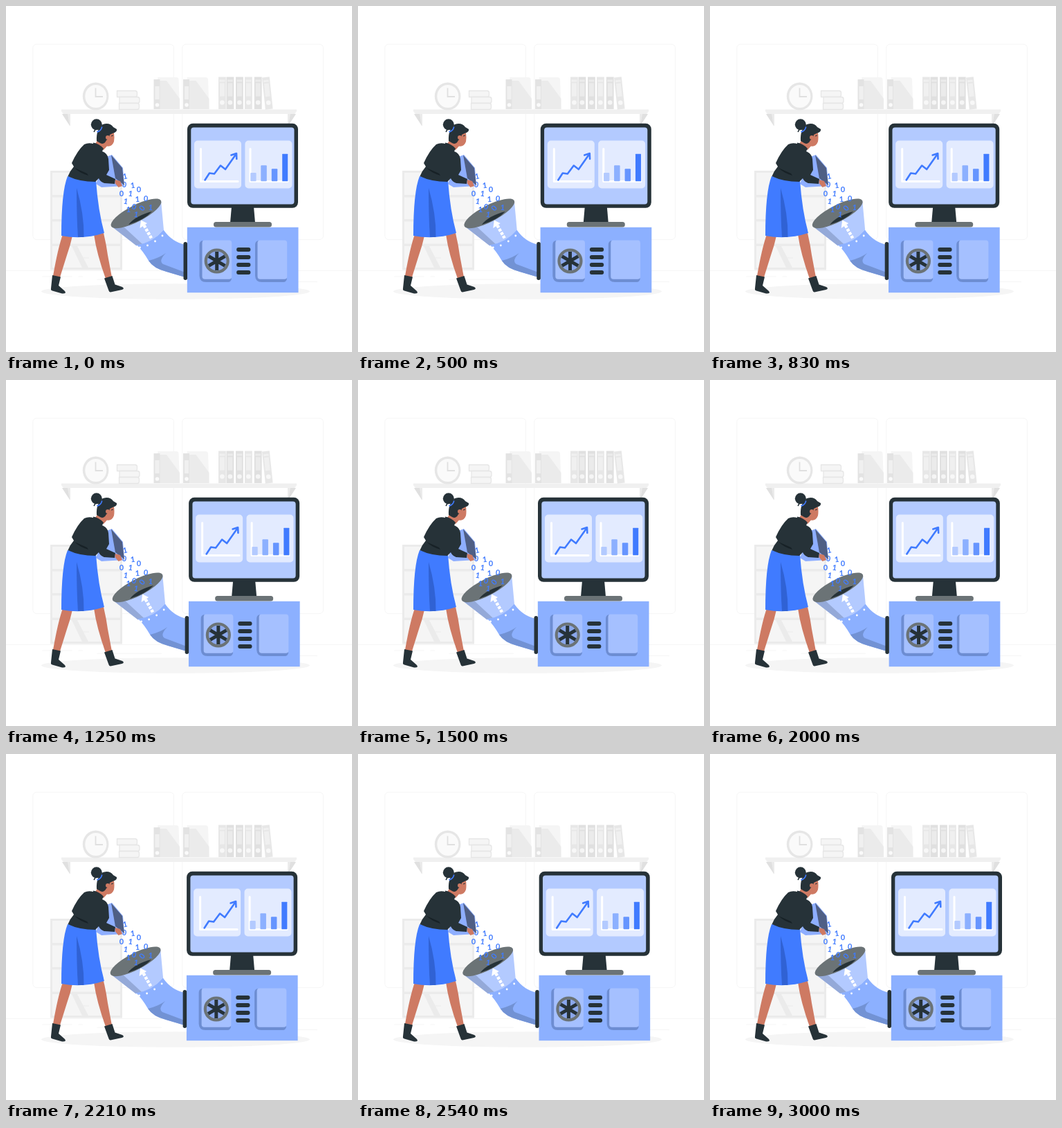
These frames come from a looping animation (500 px wide and 500 px high, 3040 ms). An HTML page:

```html
<!DOCTYPE html>
<html lang="en">
<head>
<meta charset="utf-8">
<style>
html, body { margin: 0; width: 100%; height: 100%; overflow: hidden; background: #fff; }
svg { display: block; width: 100vw; height: 100vh; }
#digits { font: 700 11px Lato, sans-serif; fill: #407bff; text-anchor: middle; }
</style>
</head>
<body>
<svg viewBox="0 0 500 500">
  <defs>
    <g id="folder">
      <path d="M219 103H246Q249 103 249.500 106L251 149H222Z" fill="#f5f5f5"/>
      <path d="M221 108H232L251 134V149H221Z" fill="#ebebeb"/>
      <path d="M213.500 106H222.500V149H213.500Z" fill="#e3e3e3"/>
      <path d="M215.500 116H221.500V135H215.500Z" fill="#f0f0f0"/>
      <circle cx="218.500" cy="143" r="2.800" fill="#fafafa"/>
    </g>
    <g id="binder">
      <path d="M0 0H10.800V46.500H0Z" fill="#e0e0e0"/>
      <path d="M1.500 4H9.300V7H1.500ZM2 9H8.800V28H2Z" fill="#ebebeb"/>
      <circle cx="5.400" cy="37" r="3.300" fill="#f5f5f5"/>
    </g>
    <path id="book" d="M0 0H26Q29 0 29 3V6Q29 9 26 9H0Z" fill="#f5f5f5" stroke="#e6e6e6" stroke-width="1.300"/>
  </defs>

  <!-- room -->
  <g fill="none" stroke="#ebebeb" stroke-width=".5">
    <rect x="38.800" y="55.200" width="203.700" height="282.400" rx="5.500"/>
    <rect x="254.800" y="55.200" width="203.700" height="282.400" rx="5.500"/>
    <path d="M0 382.500H500M416.800 398.600H450M52.500 391H95.600M104.600 391H110.900M131.500 395.200H225.100"/>
  </g>
  <ellipse cx="245" cy="412.500" rx="194" ry="11.300" fill="#f5f5f5"/>

  <rect x="64" y="238" width="104" height="143" fill="#f5f5f5"/>
  <g fill="#ebebeb">
    <path d="M64 238H168V241H64ZM64 273H168V276.500H64ZM64 308H168V311.500H64ZM64 343.500H168V347H64ZM64 378H168V381.500H64ZM64 238H67V381H64ZM165 238H168V381H165Z"/>
    <path d="M95 347H103L119 378H110Z"/>
  </g>
  <path d="M111 364H120" stroke="#ebebeb"/>

  <path d="M80 149.500H420V152L417 156H83L80 152Z" fill="#f0f0f0"/>
  <path d="M81 156H92V173ZM419 156H408V173Z" fill="#e0e0e0"/>
  <path d="M89 156H93V173H92ZM407 156H411L408 173H407Z" fill="#ebebeb"/>

  <ellipse cx="129.600" cy="130.500" rx="18.800" ry="20" fill="#e6e6e6"/>
  <ellipse cx="129.800" cy="130.500" rx="15.500" ry="16.500" fill="#fafafa"/>
  <path d="M129.500 118.500V131H140" fill="none" stroke="#e0e0e0" stroke-width="1.800"/>
  <use href="#book" x="162.500" y="122.500" transform="translate(-2)"/>
  <use href="#book" x="164" y="131.500"/>
  <use href="#book" x="163.500" y="140.500"/>
  <use href="#folder"/>
  <use href="#folder" x="42.500"/>
  <use href="#binder" x="307" y="102.500" opacity=".75"/>
  <use href="#binder" x="318.500" y="102.500"/>
  <use href="#binder" x="332" y="102.500"/>
  <use href="#binder" x="345" y="102.500" opacity=".75"/>
  <use href="#binder" x="358.800" y="102.500"/>
  <use href="#binder" transform="translate(370 103.500) rotate(-6)" opacity=".75"/>

  <g id="machine">
    <path d="M188 344Q198 354 206 368Q213 379 232 384L259 392V345Q240 341 228 324Z" fill="#8cb0ff"/>
    <path d="M206 368Q222 364 231 357Q220 368 227 373L259 385V392L232 384Q213 379 206 368Z" fill="#7292d4"/>
    <path d="M152 318L188 346Q212 343 228 324L224 281Z" fill="#b3caff"/>
    <path d="M152 318L188 346L197 344L171 320Z" fill="#94a9d8"/>
    <path d="M188 346Q212 343 228 324" fill="none" stroke="#8cb0ff"/>
    <ellipse cx="188" cy="299.800" rx="40.500" ry="12" transform="rotate(-27.200 188 299.800)" fill="#6b7376"/>
    <path d="M177 316Q187 303 211 297Q200 309 177 316Z" fill="#263238"/>
    <g fill="#fff">
      <circle cx="193.500" cy="349" r="1.400"/><circle cx="204.500" cy="346" r="1.400"/>
      <circle cx="215.500" cy="340" r="1.400"/><circle cx="226" cy="332" r="1.400"/>
      <path d="M195 309.500L204 314L193.500 321Z"/>
    </g>
    <path d="M199.500 317L210 335.500" stroke="#fff" stroke-width="4.500" stroke-dasharray="4 1.800"/>
    <rect x="261.800" y="319.800" width="160.700" height="94.400" fill="#8cb0ff"/>
    <rect x="256.500" y="341" width="5.500" height="55" rx="2.700" fill="#263238"/>
    <path d="M284 339Q279.500 340 279.500 345V390Q280 399 289 399H321Q325 399 326 394ZM364.500 339Q360 340 360 345V390Q360.500 399 369.500 399H401Q405 399 406 394Z" fill="#6d8dd2"/>
    <rect x="283.500" y="338.500" width="42.700" height="56.300" rx="4" fill="#a5c0ff"/>
    <rect x="363.500" y="338.500" width="42.700" height="56.300" rx="4" fill="#a5c0ff"/>
    <circle cx="304.700" cy="368.500" r="16" fill="#8aa7eb" stroke="#6b7376" stroke-width="4.200"/>
    <path d="M304.700 355V382M293 361.700L316.400 375.300M293 375.300L316.400 361.700" stroke="#263238" stroke-width="5"/>
    <path d="M336 352H350.500M336 363H350.500M336 374H350.500M336 385H350.500" stroke="#263238" stroke-width="5.800" stroke-linecap="round"/>

    <path d="M326 290H358L360 313H324Z" fill="#263238"/>
    <rect x="300" y="312" width="84" height="7.500" rx="3.500" fill="#6b7376"/>
    <rect x="262" y="169.800" width="160" height="122" rx="8" fill="#263238"/>
    <rect x="267.300" y="175.500" width="149.200" height="111" rx="4" fill="#b3caff"/>
    <rect x="272" y="194.500" width="68" height="69" rx="5" fill="#e3ebff"/>
    <rect x="345.400" y="194.500" width="68" height="69" rx="5" fill="#e3ebff"/>
    <path d="M281.500 206.500V253.600H335M353 206.500V253.600H407" fill="none" stroke="#fff" stroke-width="3" stroke-linecap="round" stroke-linejoin="round"/>
    <g fill="none" stroke="#407bff" stroke-width="2.600" stroke-linecap="round" stroke-linejoin="round">
      <path d="M287.500 251.500L294 241.500L301 242.500L310 230.500L317 236L332.500 214M325.500 215.500L333 213L333.300 221"/>
    </g>
    <rect x="353.300" y="241" width="8.300" height="12.300" rx="1" fill="#b3caff"/>
    <rect x="368.300" y="230.300" width="8.500" height="23" rx="1" fill="#8cb0ff"/>
    <rect x="383.800" y="235.300" width="8.500" height="18" rx="1" fill="#6695ff"/>
    <rect x="399.200" y="213.800" width="8" height="39.500" rx=".5" fill="#407bff"/>
  </g>
  <g id="digits"></g>

  <!-- woman -->
  <path d="M82 330L96 332Q93 346 88 360L78 392L68 390Q75 350 82 330ZM127 330L141 328Q145 345 147 360L153 392L144 394Q131 358 127 330Z" fill="#ce7a63"/>
  <path d="M67 389L79 391.500L76 404L85 412Q88 416 81 415.500L67 411.500Q64.500 411 65 408ZM142 393.500L153.500 390L157.500 402.500L168 406Q172 408.500 167.500 410L151 413.500Q149 413.500 148 410Z" fill="#263238"/>
  <path d="M145 218L153 215L169 234L171 260L138 262L130 257Z" fill="#8eaeff"/>
  <path d="M152 215.500L168 234L171 259L158 249Z" fill="#4f5f85"/>
  <path d="M89 246Q80 268 80 332Q112 338 142 328Q133 295 130 252Z" fill="#407bff"/>
  <path d="M102 263Q102 305 104 334L112.500 334Q113 300 102 263Z" fill="#3062d4"/>
  <path d="M137 187L156 183Q157 190 156 196Q153 204 146 202.500L141 208L129 199Z" fill="#ce7a63"/>
  <path d="M126 197.500Q135 199 141 206L139 210Q147 213 148 221L149 237L145 244L158 250L157 257L142 256Q136 254 134 249L129 254Q106 254 89.500 246Q92 239 98 232L95 227Q103 209 113 200Q119 197 126 199Z" fill="#263238"/>
  <path d="M99 234L117 242L119 245Q108 242 99 234Z" fill="#172126"/>
  <path d="M158 251L165 253L168 260L162.500 262L157.500 256Z" fill="#ce7a63"/>
  <circle cx="130.800" cy="171.300" r="8" fill="#263238"/>
  <path d="M131 195Q130 178 140 171Q150 168 155 175L160 178Q161 182 154 184L150 186Q149 192 145 194Q142 201 136 198Z" fill="#263238"/>
  <path d="M131 181Q137 180 138 174L139.500 175Q138 181 132 183Z" fill="#407bff"/>
  <path d="M130 177L127 182" stroke="#263238" stroke-width="1.500"/>
  <circle cx="147" cy="190" r="3" fill="#ce7a63"/>
  <path d="M152 188L155 187" stroke="#263238"/>
</svg>
<script>
// digit, centre x, centre y, tilt
const digits = [
  [0, 164, 245, -15], [1, 172, 246, -12], [0, 171, 258, 8], [1, 183, 259, -8], [0, 192, 265, 0],
  [0, 167, 271, 0], [1, 180, 271, 8], [1, 173, 282, 10], [1, 190, 279, -4], [0, 202, 278, 6],
  [1, 177, 293.500, 0], [0, 185, 290, 15], [1, 188, 301, 10], [0, 196.500, 292, -50], [1, 209, 291, 4]
];
document.getElementById('digits').innerHTML = digits.map(([d, x, y, a]) =>
  `<text transform="translate(${x} ${y}) rotate(${a})" y="4">${d}</text>`).join('');

// shake: time in ms, horizontal offset
const keys = [[0, 0], [300, -1], [600, 2], [900, -4], [1185, 4], [1500, -2],
  [1800, 4], [2125, -4], [2400, 2], [2700, -1], [3000, 0]];

// CSS "ease", cubic-bezier(.25, .1, .25, 1)
function ease(x) {
  let lo = 0, hi = 1;
  for (let i = 0; i < 20; i++) {
    const s = (lo + hi) / 2;
    if (.75 * s * (1 - s) + s ** 3 < x) lo = s; else hi = s;
  }
  return .3 * lo * (1 - lo) ** 2 + 3 * lo * lo * (1 - lo) + lo ** 3;
}

function offset(t) {
  const i = keys.findIndex(k => k[0] > t);
  if (i < 0) return 0;
  const [t0, x0] = keys[i - 1], [t1, x1] = keys[i];
  return x0 + (x1 - x0) * ease((t - t0) / (t1 - t0));
}

const machine = document.getElementById('machine');
function draw() {
  const t = performance.now() % 3040;
  const step = Math.floor(t * .024 + .1); // 24 steps per second
  machine.setAttribute('transform', `translate(${offset(step / .024).toFixed(3)} 0)`);
  requestAnimationFrame(draw);
}
draw();
</script>
</body>
</html>
```
